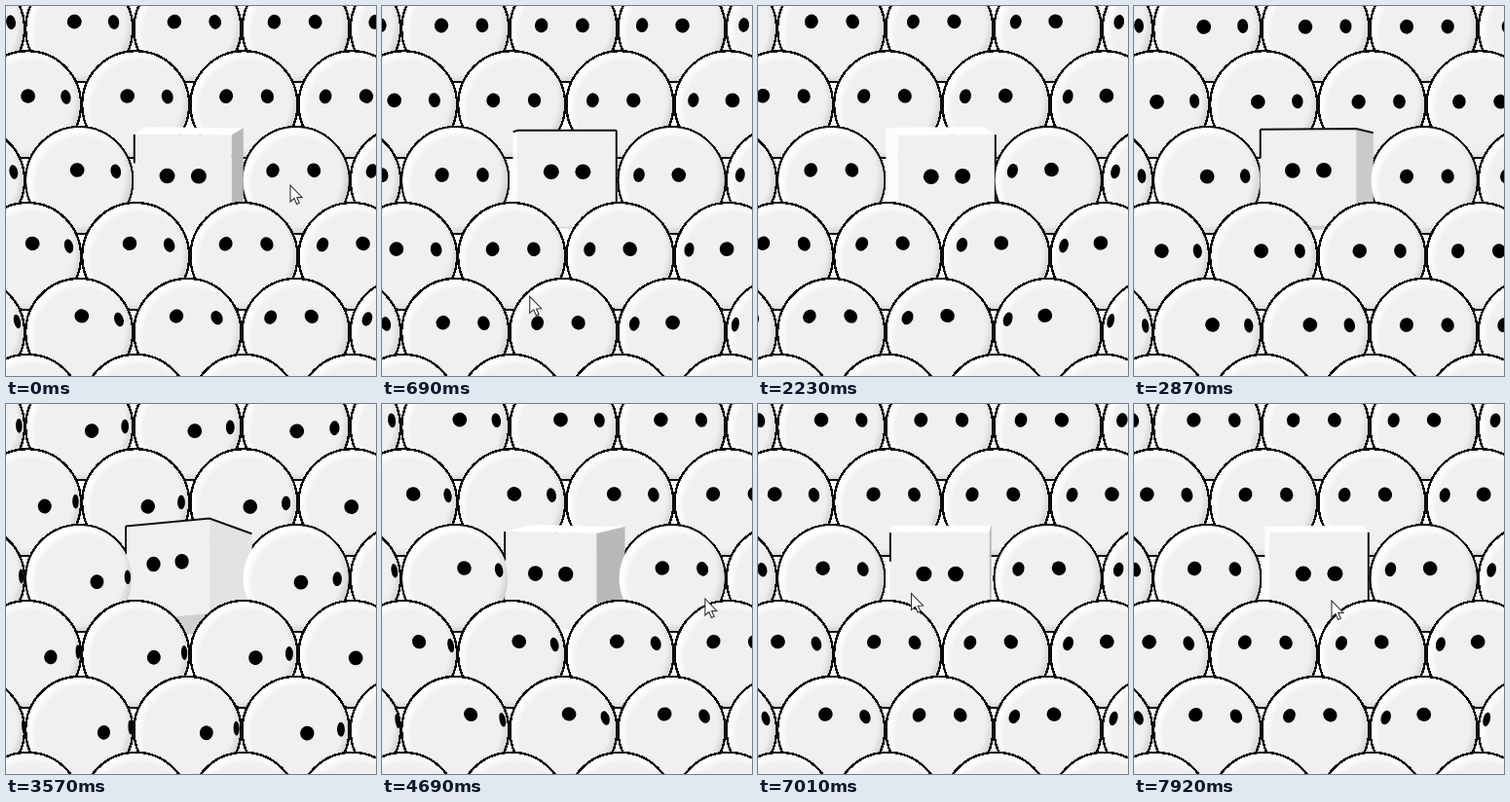
These frames come from a looping animation (380 by 380 pixels, 7990 ms). An HTML page:

```html
<!DOCTYPE html>
<html lang="en">
<head>
<meta charset="utf-8">
<title>Looking heads</title>
<style>
html, body { margin: 0; width: 100%; height: 100%; overflow: hidden; background: #fff; }
svg { display: block; width: 100vw; height: 100vh; }
</style>
</head>
<body>
<svg id="stage" viewBox="0 0 380 380">
  <defs>
    <radialGradient id="lit" cx=".535" cy=".535" r=".525">
      <stop offset=".84" stop-color="#f0f0f0"/>
      <stop offset=".97" stop-color="#fff"/>
    </radialGradient>
    <radialGradient id="shade" cx=".45" cy=".45" r=".565">
      <stop offset=".8" stop-color="#f0f0f0" stop-opacity="0"/>
      <stop offset=".86" stop-color="#eee"/>
      <stop offset="1" stop-color="#cfcfcf"/>
    </radialGradient>
  </defs>
</svg>
<script>
const LOOP = 7990, R = 55, SPREAD = 22.6 * Math.PI / 180;
const stage = document.getElementById('stage');
const { sin, cos, atan, atan2, sqrt, abs, PI } = Math;

function add(tag, attrs) {
  const el = document.createElementNS('http://www.w3.org/2000/svg', tag);
  set(el, attrs);
  return stage.appendChild(el);
}
function set(el, attrs) {
  for (const k in attrs) el.setAttribute(k, attrs[k]);
}

// time, gaze x, gaze height, gaze distance
const gazeKeys = [
  [0, 284, 168, 665], [1320, 62, 74, 690], [2230, 88, 172, 830], [3570, 637, 20, 770],
  [4690, 428, 168, 680], [6170, 288, 168, 665], [7920, 166, 164, 640]
];
// time, tip x, tip y
const cursorKeys = [
  [0, 292, 184], [700, 150, 300], [1320, 40, 430], [2230, -60, 400], [3300, 560, 480],
  [3900, 500, 330], [4690, 332, 200], [6170, 117, 188], [7920, 203, 202]
];

// Monotone cubic through the keys
function sample(keys, t) {
  let i = 0;
  while (i < keys.length - 2 && t > keys[i + 1][0]) i++;
  const a = keys[i], b = keys[i + 1], w = b[0] - a[0];
  const u = Math.min(1, (t - a[0]) / w);
  const slope = (j, c) => {
    const p = keys[j], q = keys[j + 1];
    return p && q ? (q[c] - p[c]) / (q[0] - p[0]) : 0;
  };
  const tangent = (j, c) => {
    const m = slope(j - 1, c), n = slope(j, c);
    return m * n > 0 ? 2 * m * n / (m + n) : 0;
  };
  return a.slice(1).map((v, k) => {
    const c = k + 1, d = b[c] - v;
    const m = tangent(i, c) * w, n = tangent(i + 1, c) * w;
    return v + u * (m + u * (3 * d - 2 * m - n + u * (m + n - 2 * d)));
  });
}

const heads = [], cube = {};

function body(x, y, r, outline) {
  add('circle', { cx: x, cy: y, r, fill: 'url(#lit)' });
  add('circle', { cx: x, cy: y, r, fill: 'url(#shade)' });
  if (outline) add('circle', {
    cx: x, cy: y, r, fill: 'none', stroke: '#0b0b0b', 'stroke-width': 2.4,
    'shape-rendering': 'crispEdges'
  });
}

function makeCube() {
  for (const name of ['top', 'bottom', 'left', 'right', 'front'])
    cube[name] = add('polygon', { 'stroke-width': .4, 'stroke-linejoin': 'round' });
  for (const name of ['rim', 'edge'])
    cube[name] = add('polyline', { fill: 'none', stroke: '#111', 'stroke-width': 2 });
  cube.eyes = [0, 1].map(() => add('ellipse', {}));
}

for (let row = 0; row < 6; row++) {
  const y = 23.3 + 77.9 * row, odd = row % 2, line = [];
  for (let i = 0; i < 5 - odd; i++) {
    const x = (odd ? 22 : -36) + 111.2 * i;
    if (row === 2 && i === 2) continue;
    line.push(x);
    body(x, y, R, true);
  }
  if (row === 2) {
    makeCube();
    // Heads beside the cube bulge into it without an outline
    [line[1], line[2]].forEach(x => body(x, y, R - 1, false));
  }
  for (const x of line)
    heads.push({ x, y, row, eyes: [0, 1].map(() => add('ellipse', {})) });
}

const cursor = add('path', {
  d: 'M0 0V17L4 13.5L6.6 19.5L9.3 18.3L6.8 12.6L12 12.4Z',
  fill: '#fff', stroke: '#333', 'stroke-width': 1.1
});

function yawAt(x, row, [gx, , dist]) {
  return atan((gx - 6 * row - x) / (dist * (1 - .103 * row)));
}

function drawHead(head, gaze) {
  const yaw = yawAt(head.x, head.row, gaze);
  const tilt = .21 - gaze[1] / (690 - 71 * head.row);
  head.eyes.forEach((eye, i) => {
    const a = yaw + (i ? SPREAD : -SPREAD);
    const x = sin(a), y = cos(a) * sin(tilt) - .098;
    const depth = sqrt(Math.max(0, 1 - x * x - y * y));
    set(eye, {
      rx: cos(a) > 0 ? 7.4 * depth : 0, ry: 7.4,
      transform: `translate(${head.x + R * x} ${head.y + R * y}) rotate(${atan2(y, x) * 180 / PI})`
    });
  });
}

function drawCube(gaze) {
  const yaw = -.75 * yawAt(187, 2, gaze);
  const pitch = (gaze[1] - 126) * .1 * PI / 180;
  const half = 51 - 6 * abs(yaw), tall = 49.5;
  const at = (x, y, z) => {
    const depth = z * cos(yaw) - x * sin(yaw);
    return [187.7 + x * cos(yaw) + z * sin(yaw), 178 + y * cos(pitch) + depth * sin(pitch)];
  };
  const corner = (x, y, z) => at(x * half, y * tall, z * half);
  const face = (name, shown, grey, ...pts) => {
    const fill = `rgb(${grey},${grey},${grey})`;
    set(cube[name], {
      points: pts.map(p => corner(...p)).join(' '), fill, stroke: fill,
      visibility: shown ? 'visible' : 'hidden'
    });
  };
  const side = s => [[s, -1, 1], [s, -1, -1], [s, 1, -1], [s, 1, 1]];
  const lid = s => [[-1, s, 1], [1, s, 1], [1, s, -1], [-1, s, -1]];
  const dim = Math.round(227 - 43 * Math.min(1, Math.max(0, (gaze[1] - 20) / 140)));
  face('top', pitch > 0, 254, ...lid(-1));
  face('bottom', pitch < 0, 208, ...lid(1));
  face('left', yaw > 0, 252, ...side(-1));
  face('right', yaw < 0, dim, ...side(1));
  face('front', true, 240, [-1, -1, 1], [1, -1, 1], [1, 1, 1], [-1, 1, 1]);

  const look = yaw < 0 ? -1 : 1;
  const path = (...pts) => pts.map(p => corner(...p)).join(' ');
  set(cube.edge, { points: path([look, -1, 1], [look, look > 0 ? 1 : -.4, 1]) });
  set(cube.rim, {
    points: path([look, -1, 1], [-look, -1, 1], [-look, -1, -1]),
    visibility: pitch < 0 ? 'visible' : 'hidden'
  });
  cube.eyes.forEach((eye, i) => {
    const [cx, cy] = at(i ? 16.3 : -16.3, -7, half);
    set(eye, { cx, cy, rx: 8 * cos(yaw), ry: 7.8 });
  });
}

function render(t) {
  const gaze = sample(gazeKeys, t);
  heads.forEach(head => drawHead(head, gaze));
  drawCube(gaze);
  cursor.setAttribute('transform', `translate(${sample(cursorKeys, t)})`);
}

const start = performance.now();
function tick() {
  render((performance.now() - start) % LOOP);
  requestAnimationFrame(tick);
}
tick();
</script>
</body>
</html>
```
